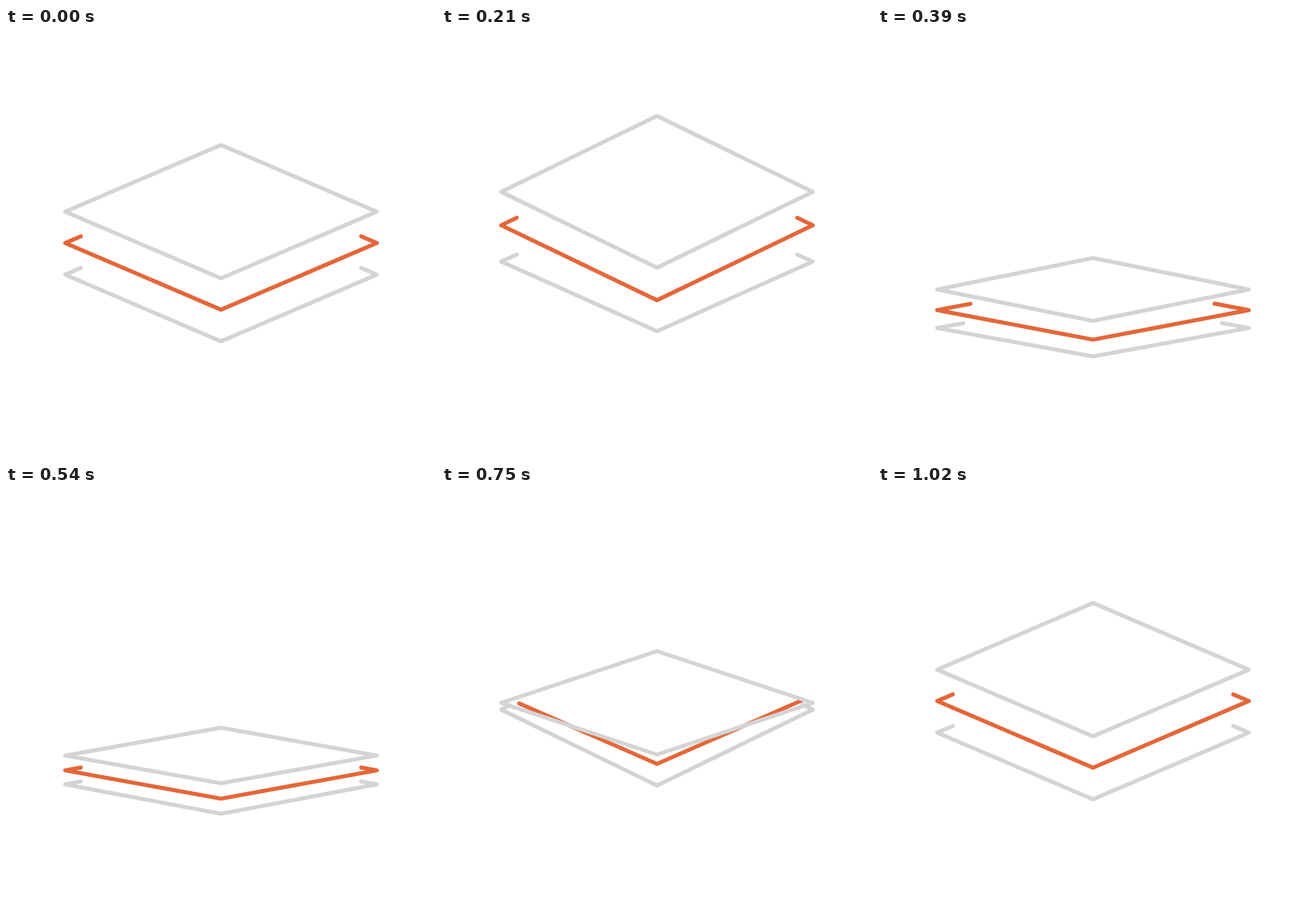
Animation, 748 px wide and 748 px high, one loop 4.09 s. Source, as an HTML page:

```html
<!DOCTYPE html>
<html lang="en">
<head>
<meta charset="utf-8">
<title>Layers</title>
<style>
  html, body { margin: 0; width: 100%; height: 100%; overflow: hidden; background: #fff; }
  svg { display: block; width: 100%; height: 100%; }
  path { fill: none; stroke: #d4d4d4; stroke-width: 7; stroke-linecap: round; stroke-linejoin: round; }
  #middle { stroke: #e4673a; }
</style>
</head>
<body>
<svg viewBox="0 0 748 748">
  <path id="bottom"/>
  <path id="middle"/>
  <path id="top"/>
</svg>
<script>
  const LOOP = 4090, STEP = 30, DELAY = 30;
  const CENTER = 374, HALF = 271, LEFT = CENTER - HALF, RIGHT = CENTER + HALF;
  const TAIL = 27;

  // Height of the side corners in each pose; the half height is shared.
  const layers = {
    top: { rest: 319.5, up: 285, down: 469.5, delay: 2 * DELAY },
    middle: { rest: 374, up: 340, down: 497, delay: DELAY },
    bottom: { rest: 429, up: 389, down: 524, delay: 0 }
  };
  const halfHeight = { rest: 116, up: 132, down: 48 };

  const moves = [
    { from: 'rest', to: 'up', start: 0, end: 150, ease: [0.28, 0.62] },
    { from: 'up', to: 'down', start: 150, end: 450, ease: [0.467, 0] },
    { from: 'down', to: 'up', start: 450, end: 750, ease: [1, 0.8] },
    { from: 'up', to: 'rest', start: 750, end: 960, ease: [0.63, 0.6] }
  ];

  const mix = (a, b, k) => a + (b - a) * k;

  // cubic-bezier(x1, 0, x2, 1)
  function bezier([x1, x2], x) {
    let low = 0, high = 1;
    for (let i = 0; i < 24; i++) {
      const u = (low + high) / 2, v = 1 - u;
      if (3 * v * v * u * x1 + 3 * v * u * u * x2 + u * u * u < x) low = u;
      else high = u;
    }
    return low * low * (3 - 2 * low);
  }

  function pose(layer, time) {
    const t = Math.min(Math.max(time - layer.delay, 0), 960);
    const move = moves.find(m => t <= m.end);
    const k = t === 0 ? 0 : t === move.end ? 1
      : bezier(move.ease, (t - move.start) / (move.end - move.start));
    return {
      y: mix(layer[move.from], layer[move.to], k),
      h: mix(halfHeight[move.from], halfHeight[move.to], k)
    };
  }

  // Tails grow when the sheet above is far away and shrink when it comes close.
  function tails(sheet, above) {
    const reach = (sheet.y - above.y) * HALF / (sheet.h + above.h);
    const grow = 8.5 * Math.sqrt(Math.max(0, reach - 79));
    const shrink = Math.min(0, reach - 37);
    return [TAIL + grow + shrink * 1.09, TAIL + grow * 1.06 + shrink * 0.88];
  }

  function openSheet(sheet, above) {
    const [left, right] = tails(sheet, above);
    const end = (tail, x) => `${x} ${sheet.y - sheet.h / HALF * tail}`;
    const points = [end(left, LEFT + Math.abs(left))];
    if (left > 0) points.push(`${LEFT} ${sheet.y}`);
    points.push(`${CENTER} ${sheet.y + sheet.h}`);
    if (right > 0) points.push(`${RIGHT} ${sheet.y}`);
    points.push(end(right, RIGHT - Math.abs(right)));
    return 'M' + points.join('L');
  }

  const closedSheet = ({ y, h }) =>
    `M${LEFT} ${y}L${CENTER} ${y - h}L${RIGHT} ${y}L${CENTER} ${y + h}Z`;

  const setPath = (id, d) => document.getElementById(id).setAttribute('d', d);

  function draw(time) {
    const top = pose(layers.top, time);
    const middle = pose(layers.middle, time);
    const bottom = pose(layers.bottom, time);
    setPath('top', closedSheet(top));
    setPath('middle', openSheet(middle, top));
    setPath('bottom', openSheet(bottom, middle));
  }

  const begin = performance.now();
  function tick() {
    const time = (performance.now() - begin) % LOOP;
    draw(Math.floor(time / STEP) * STEP);
    requestAnimationFrame(tick);
  }
  tick();
</script>
</body>
</html>
```
